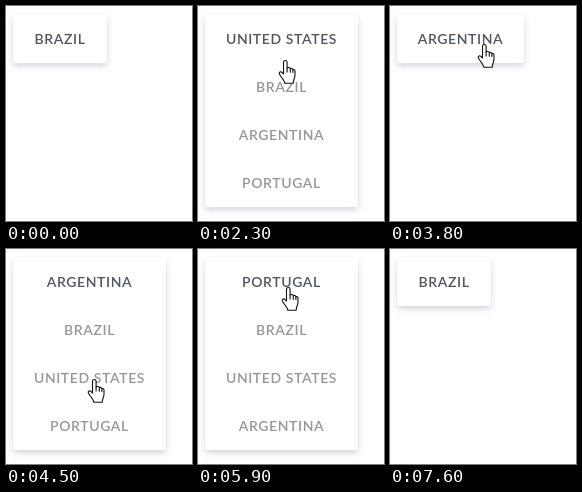
Animation of 186x215 px, one loop 8 s. Source, as an HTML page:

```html
<!DOCTYPE html>
<html lang="en">
<head>
<meta charset="utf-8">
<title>Country menu</title>
<style>
  html, body {
    margin: 0;
    width: 100%;
    height: 100%;
    overflow: hidden;
    background: #fff;
  }
  #menu {
    position: absolute;
    left: 7px;
    top: 9px;
    background: #fff;
    box-shadow: 0 3px 6px rgba(75, 60, 95, .22);
    overflow: hidden;
    font: 600 14px/48px Lato, "Open Sans", sans-serif;
    letter-spacing: .6px;
    text-align: center;
    white-space: nowrap;
    color: #969799;
  }
  #menu div { height: 48px; }
  #menu div:first-child { color: #50555e; }
  svg {
    position: absolute;
    left: 0;
    top: 0;
    overflow: visible;
    fill: #fff;
    stroke: #111;
    stroke-width: 1.1;
    stroke-linejoin: round;
    stroke-linecap: round;
  }
</style>
</head>
<body>
<div id="menu"><div></div><div></div><div></div><div></div></div>
<svg id="cursor" width="18" height="25">
  <path id="arrow" d="M.5.5V16.5L4.3 13l2.7 6.4 2.3-1L6.6 12.2h5.2z"/>
  <g id="hand" transform="translate(-6.5 0)">
    <path d="M5 14V2.3a1.8 1.8 0 0 1 3.6 0V8c.6-.9 3-.7 3.2.8.7-.8 2.4-.4 2.6.9.9-.5 2.1.1 2.1 1.4V15c0 3-1.6 4-1.8 8.2H6.3C6 20 1.8 16.5.8 13.8c-.6-1.7 1.5-2.6 2.6-1.4z"/>
    <path fill="none" d="M8.6 8v4M11.8 8.8v3.4M14.4 9.7v2.8"/>
  </g>
</svg>
<script>
const LOOP = 8000, STEP = 100, ROW = 48, LEFT = 7, TOP = 9, OPEN_WIDTH = 153;
const names = ["BRAZIL", "UNITED STATES", "ARGENTINA", "PORTUGAL"];
const widths = [94, 153, 127, 121];

// time, selected item, open
const states = [
  [0, 0, false], [1000, 0, true],
  [1700, 1, false], [2300, 1, true],
  [3300, 2, false], [4100, 2, true],
  [5000, 3, false], [5900, 3, true],
  [6800, 0, false]
];

// start, end, x, y of the pointer tip
const SHOW = 400, HIDE = 7600;
const moves = [
  [400, 400, 96, 132], [400, 700, 68, 36],
  [1000, 1400, 82, 79], [1700, 2000, 84, 38],
  [2200, 2900, 98, 121], [3300, 3800, 94, 38],
  [4100, 4500, 88, 130], [4500, 4900, 97, 176],
  [5000, 5200, 97, 84], [5200, 5500, 90, 38],
  [6200, 6400, 84, 81], [6600, 6700, 86, 43],
  [6700, 7100, 68, 36], [7200, 7500, 95, 194]
];

const $ = id => document.getElementById(id);
const menu = $("menu"), cursor = $("cursor"), arrow = $("arrow"), hand = $("hand");
const rows = [...menu.children];
const show = (el, on) => { el.style.display = on ? "" : "none"; };

function pointerAt(t) {
  let [, , x, y] = moves[0];
  for (const [start, end, toX, toY] of moves) {
    if (t < start) break;
    const p = end > start ? Math.min(1, (t - start) / (end - start)) : 1;
    const e = p * (1.4 - .4 * p);
    x += (toX - x) * e;
    y += (toY - y) * e;
  }
  return [Math.round(x), Math.round(y)];
}

function draw(t) {
  const [, picked, open] = states.filter(s => s[0] <= t).pop();
  const order = [picked, ...names.keys()].filter((n, i) => !i || n !== picked);
  rows.forEach((row, i) => { row.textContent = names[order[i]]; });
  const width = open ? OPEN_WIDTH : widths[picked];
  const height = open ? ROW * names.length : ROW;
  menu.style.width = width + "px";
  menu.style.height = height + "px";

  const [x, y] = pointerAt(t);
  const inside = x >= LEFT && x < LEFT + width && y >= TOP && y < TOP + height;
  cursor.style.transform = `translate(${x}px, ${y}px)`;
  show(cursor, t >= SHOW && t < HIDE);
  show(hand, inside);
  show(arrow, !inside);
}

let last = -1;
function tick() {
  const t = Math.floor(performance.now() % LOOP / STEP) * STEP;
  if (t !== last) draw(last = t);
  requestAnimationFrame(tick);
}
tick();
</script>
</body>
</html>
```
